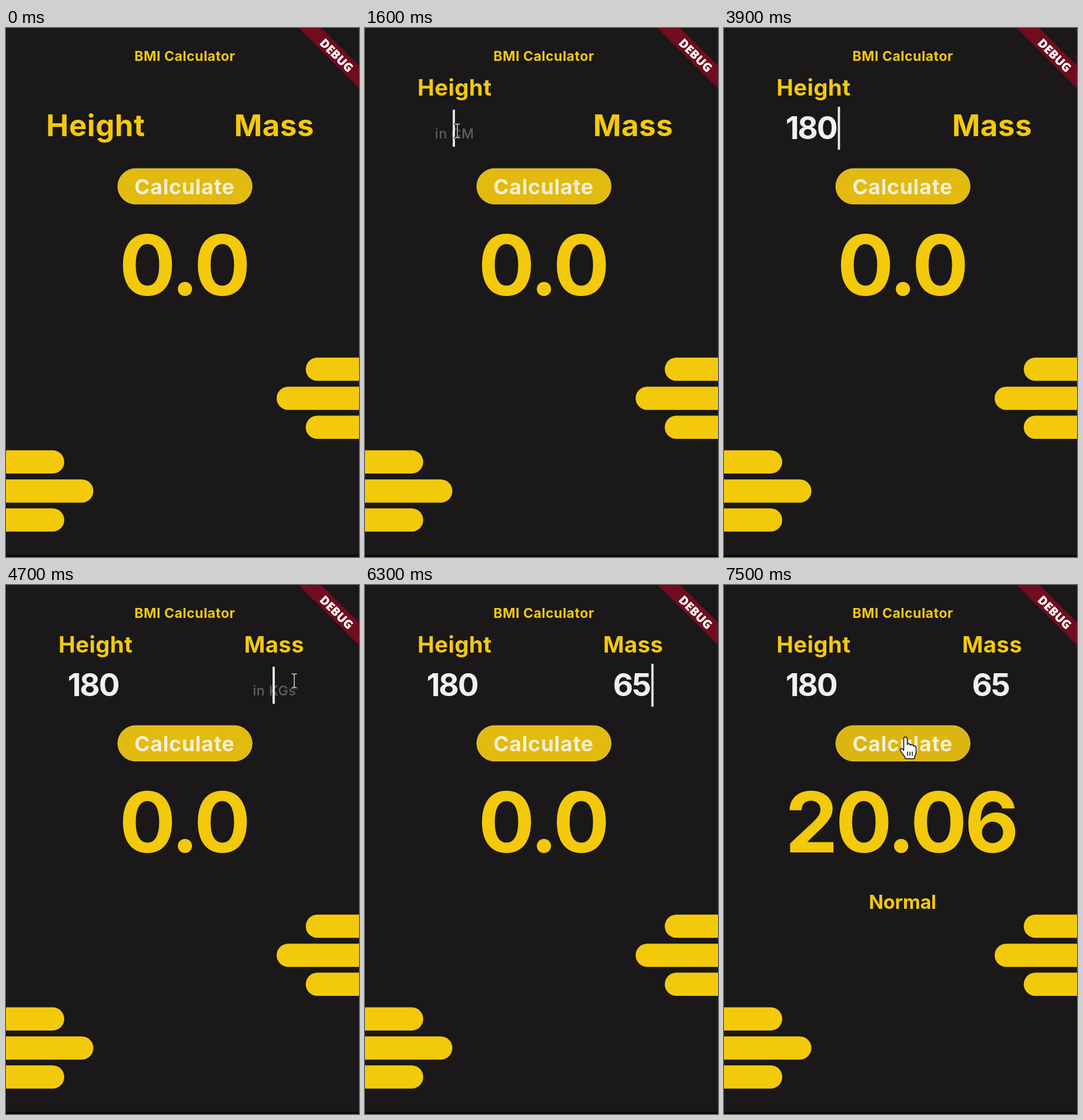
These frames come from a looping animation (600x900 px, 8000 ms). An HTML page:

```html
<!DOCTYPE html>
<html lang="en">
<head>
<meta charset="utf-8">
<title>BMI Calculator</title>
<style>
  html, body { margin: 0; width: 100%; height: 100%; overflow: hidden; background: #1a1819; }
  svg { display: block; width: 100vw; height: 100vh; }
  text { font-family: Inter, "Open Sans", sans-serif; font-weight: 700; text-anchor: middle; letter-spacing: .022em; }
  .gold { fill: #f3c90c; }
  .label { font-size: 51px; letter-spacing: .01em; }
  .hint { font-size: 23px; font-weight: 500; fill: #626061; letter-spacing: .025em; }
  .value { font-size: 53px; fill: #f1f0f1; letter-spacing: -.04em; }
  .caret { fill: #e9e7e8; }
  #result { font-size: 143px; letter-spacing: -.03em; }
  #verdict { letter-spacing: -.005em; }
  #banner text { font: 800 20.5px "Open Sans", "Noto Sans", sans-serif; letter-spacing: 0; fill: #fff; }
</style>
</head>
<body>
<svg viewBox="0 0 600 900">
  <rect width="600" height="900" fill="#1a1819"/>
  <rect y="896.5" width="600" height="3.5" fill="#0d0809"/>
  <g id="bars" class="gold"></g>
  <text class="gold" x="304" y="55.5" font-size="23">BMI Calculator</text>
  <g id="fields"></g>
  <rect id="button" x="190" y="239.2" width="228.3" height="60.4" rx="30.2" stroke="#edcb3c"/>
  <text x="303.5" y="283" font-size="35.5" fill="#f6f0d8">Calculate</text>
  <text id="result" class="gold" y="455"></text>
  <text id="verdict" class="gold" x="303.5" y="550.5" font-size="32.5">Normal</text>
  <g id="banner">
    <path d="M497.500 0H536L600 64V102.500Z" fill="#700d1e"/>
    <text transform="translate(562 46.500) rotate(45)" y="7.500">DEBUG</text>
  </g>
  <g id="beam" fill="none" stroke-linecap="round">
    <path d="M-4-12Q0-12 0-9V9Q0 12-4 12M4-12Q0-12 0-9M0 9Q0 12 4 12" stroke="#111" stroke-width="3.500"/>
    <path d="M-4-12Q0-12 0-9V9Q0 12-4 12M4-12Q0-12 0-9M0 9Q0 12 4 12" stroke="#d8d6d7" stroke-width="1.500"/>
  </g>
  <g id="hand" stroke="#171516" stroke-width="1.600" stroke-linejoin="round">
    <path d="M-3 3a3 3 0 0 1 6 0V13c1-2 5-2 5.500 1c1-1.500 4.500-1 5 1.500c1.500-1 4.500 0 4.500 3V26c0 4-3 6-3 11H0c-1-5-9-11-9-16c1-3 4-1 6 2Z" fill="#fff"/>
    <path d="M3.500 25v7M7.500 25v7M11.500 25v7" fill="none"/>
  </g>
</svg>
<script>
const LOOP = 8000, STEP = 100;
const $ = id => document.getElementById(id);

function add(parent, tag, attrs, text = '') {
  const el = document.createElementNS('http://www.w3.org/2000/svg', tag);
  for (const key in attrs) el.setAttribute(key, attrs[key]);
  el.textContent = text;
  parent.append(el);
  return el;
}

const show = (el, on) => el.setAttribute('visibility', on ? 'visible' : 'hidden');
const within = (t, spans) => spans.some(([from, to]) => t >= from && t < to);
const latest = (t, events) => events.filter(e => e[0] <= t).pop();

function ease(p) {
  p = Math.min(1, Math.max(0, p));
  return p * p * (3 - 2 * p);
}

for (let i = 0; i < 3; i++) {
  const long = i === 1 ? 49.5 : 0, y = i * 49.4;
  add($('bars'), 'rect', { x: 509.5 - long, y: 560.8 + y, width: 200, height: 39.5, rx: 19.7 });
  add($('bars'), 'rect', { x: -101 + long, y: 718.5 + y, width: 200, height: 39.5, rx: 19.7 });
}

const fields = [
  {
    label: 'Height', hint: 'in CM', labelX: 152.3, hintX: 152.3, x: 148, emptyX: 151, focus: 1440,
    keys: [[0, ''], [3000, '1'], [3200, '18'], [3300, '180']],
    caretOn: [[1500, 2000], [2300, 2800], [3000, 3700], [3900, 4500]]
  },
  {
    label: 'Mass', hint: 'in KGs', labelX: 455.8, hintX: 456.3, x: 453, emptyX: 455, focus: 4530,
    keys: [[0, ''], [6100, '6'], [6300, '65']],
    caretOn: [[4600, 5100], [5600, 5800], [6100, 7200]]
  }
];

for (const f of fields) {
  const group = add($('fields'), 'g', {});
  f.labelEl = add(group, 'text', { class: 'gold label' }, f.label);
  f.hintEl = add(group, 'text', { class: 'hint', x: f.hintX, y: 188 }, f.hint);
  f.valueEl = add(group, 'text', { class: 'value', x: f.x, y: 188.5 });
  f.caretEl = add(group, 'rect', { class: 'caret', width: 3.8 });
}

// Time, cursor kind, x, y; the arrow outside the controls is not shown.
const cursor = [
  [0, ''],
  [800, 'hand', 335, 258], [900, 'hand', 296, 255], [1000, 'hand', 255, 250], [1100, 'hand', 220, 246],
  [1200, ''],
  [1500, 'beam', 157, 175], [3000, ''],
  [3700, 'beam', 172, 174], [3800, 'beam', 228, 173], [3900, ''],
  [4300, 'beam', 440, 172], [4400, 'beam', 490, 163], [6100, ''],
  [6600, 'beam', 485, 166], [6700, 'beam', 453, 192],
  [6800, 'hand', 340, 254], [6900, 'hand', 309.5, 252], [7400, 'hand', 309, 256], [7500, 'hand', 308.5, 258.5]
];

function drawField(f, t) {
  const p = ease((t - f.focus) / 167);
  const value = latest(t, f.keys)[1];
  f.labelEl.setAttribute('transform',
    `translate(${f.labelX} ${184 - 69 * p}) scale(${1 - 0.25 * p})`);
  f.hintEl.setAttribute('opacity', value ? 0 : p);
  f.valueEl.textContent = value;
  const x = value ? f.x + f.valueEl.getComputedTextLength() / 2 + 4 : f.emptyX;
  const top = value ? 134 : 139;
  f.caretEl.setAttribute('x', x - 1.9);
  f.caretEl.setAttribute('y', top);
  f.caretEl.setAttribute('height', 341 - 2 * top);
  show(f.caretEl, within(t, f.caretOn));
}

function draw(t) {
  for (const f of fields) drawField(f, t);

  const [, kind, x, y] = latest(t, cursor);
  for (const id of ['beam', 'hand']) {
    show($(id), kind === id);
    if (kind === id) $(id).setAttribute('transform', `translate(${x} ${y})`);
  }
  $('button').setAttribute('fill', kind === 'hand' ? '#dcb511' : '#e2ba10');

  const done = t >= 7200;
  $('result').textContent = done ? '20.06' : '0.0';
  $('result').setAttribute('x', done ? 300.5 : 302);
  show($('verdict'), done);
}

function tick(now) {
  draw(Math.floor(now % LOOP / STEP) * STEP);
  requestAnimationFrame(tick);
}
draw(0);
requestAnimationFrame(tick);
</script>
</body>
</html>
```
